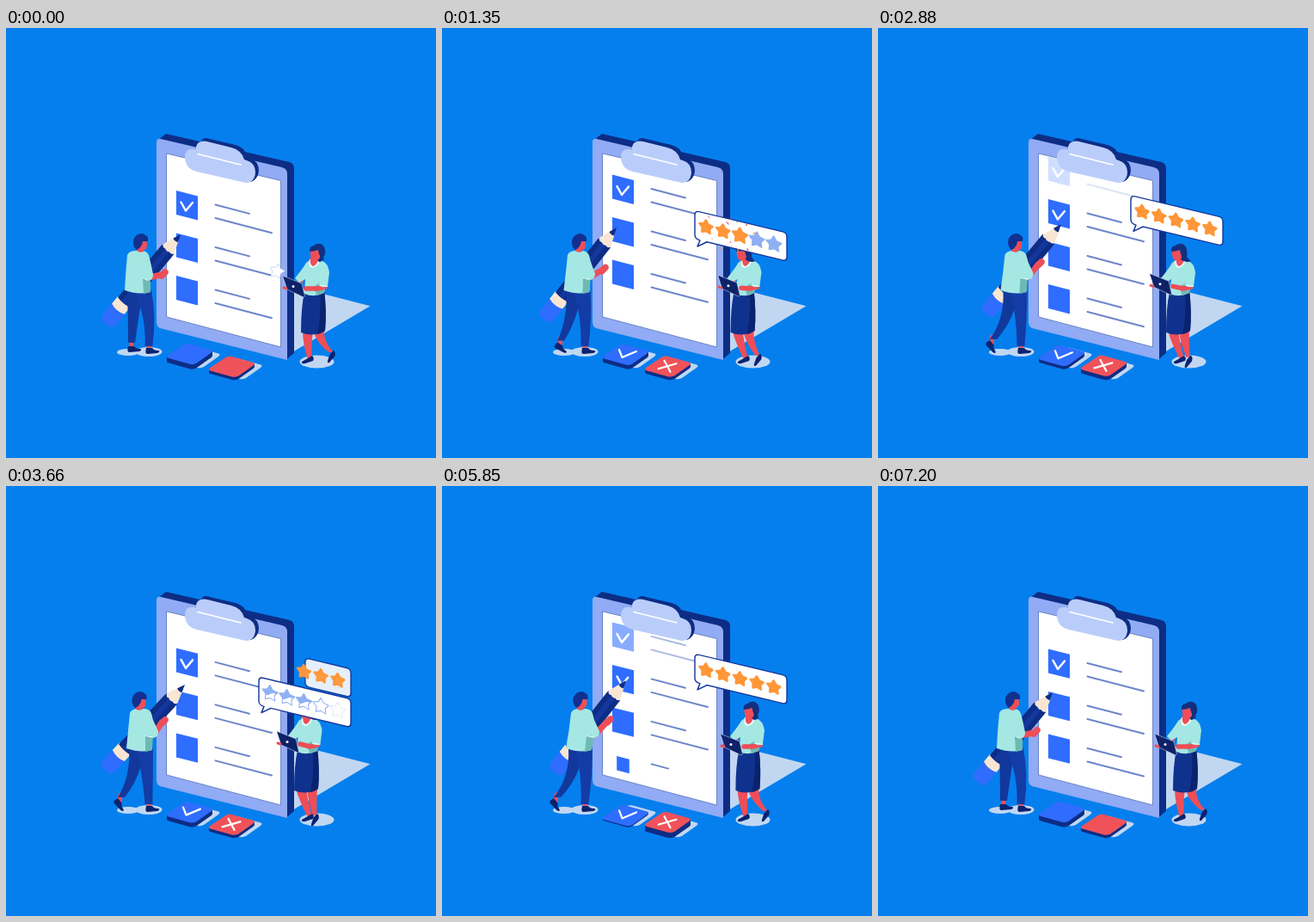
Write an HTML page with a canvas that moves like this. It is 500 px wide and 500 px high and loops after 7230 ms.

```html
<!DOCTYPE html>
<html lang="en">
<head>
<meta charset="utf-8">
<title>Checklist survey</title>
<style>
html, body { margin: 0; width: 100%; height: 100%; overflow: hidden; background: #057fee; }
canvas { display: block; width: 500px; height: 500px; }
</style>
</head>
<body>
<canvas id="stage"></canvas>
<script>
const canvas = document.getElementById('stage');
const g = canvas.getContext('2d');
const dpr = window.devicePixelRatio || 1;
canvas.width = canvas.height = 500 * dpr;

const LOOP = 7230, HALF = LOOP / 2, SLOPE = 0.26;
const BLUE = '#2f6dff', NAVY = '#0d2d85', PANTS = '#12389c', SKIN = '#ee4e57',
      MINT = '#a5e7e3', MINT2 = '#6fb9b4', SHADE = '#c1d7f1', CREAM = '#f8e6d3', ORANGE = '#ff9638';

const clamp = v => Math.max(0, Math.min(1, v));
const ramp = (t, a, b) => clamp((t - a) / (b - a));
const easeOut = v => 1 - (1 - v) ** 3;
const back = v => 1 + 2.7 * (v - 1) ** 3 + 1.7 * (v - 1) ** 2;

// Smooth curve through rows of [time, ...values]
function curve(keys, t) {
  const n = keys.length;
  if (t <= keys[0][0]) return keys[0].slice(1);
  if (t >= keys[n - 1][0]) return keys[n - 1].slice(1);
  let i = 0;
  while (keys[i + 1][0] < t) i++;
  const a = keys[i], b = keys[i + 1], d = b[0] - a[0], u = (t - a[0]) / d;
  const slope = (j, c) => {
    if (j === 0 || j === n - 1) return 0;
    const l = (keys[j][c] - keys[j - 1][c]) / (keys[j][0] - keys[j - 1][0]);
    const r = (keys[j + 1][c] - keys[j][c]) / (keys[j + 1][0] - keys[j][0]);
    return l * r <= 0 ? 0 : 2 * l * r / (l + r);
  };
  return a.slice(1).map((v, k) => {
    const c = k + 1, u2 = u * u, u3 = u2 * u;
    return (2 * u3 - 3 * u2 + 1) * v + (u3 - 2 * u2 + u) * d * slope(i, c)
      + (3 * u2 - 2 * u3) * b[c] + (u3 - u2) * d * slope(i + 1, c);
  });
}

function shape(d, fill, stroke, width = 1) {
  const p = new Path2D(d);
  if (fill) { g.fillStyle = fill; g.fill(p); }
  if (stroke) { g.strokeStyle = stroke; g.lineWidth = width; g.stroke(p); }
}

function ellipse(x, y, rx, ry, fill) {
  g.beginPath();
  g.ellipse(x, y, rx, ry, 0, 0, 7);
  g.fillStyle = fill;
  g.fill();
}

// Open line drawn up to a fraction of its length
function trace(pts, part, color, width) {
  if (part <= 0) return;
  let len = 0;
  g.beginPath();
  pts.forEach(([x, y], i) => {
    g.lineTo(x, y);
    if (i) len += Math.hypot(x - pts[i - 1][0], y - pts[i - 1][1]);
  });
  if (part < 1) g.setLineDash([len * part, len * 2]);
  g.strokeStyle = color;
  g.lineWidth = width;
  g.stroke();
  g.setLineDash([]);
}

function at(x, y, draw, angle = 0, scale = 1) {
  g.save();
  g.translate(x, y);
  g.rotate(angle);
  g.scale(scale, scale);
  draw();
  g.restore();
}

function leg([ax, ay, aw], [bx, by, bw], [cx, cy, cw], color) {
  shape(`M${ax - aw},${ay} Q${bx - bw},${by} ${cx - cw},${cy} L${cx + cw},${cy} Q${bx + bw},${by} ${ax + aw},${ay}Z`, color);
}

function board() {
  shape('M335,300.5 L423.5,323.2 L333,377Z', SHADE);
  shape('M177,130 L186,123 L330,156 Q335,158 335,163 V378 L326,385.5Z', NAVY);
  shape('M175,133 Q175,128 180,129 L321,162 Q327,164 327,169 V386 L179,349 Q175,347 175,342Z', '#91abf4');
  shape('M187,146 L319.5,177.5 V371 L187,336Z', '#fff', '#5871b8', 0.8);
}

function clip() {
  shape('M222,137 L229,129 Q232,127 237,129 L267,136 Q278,139 280,149 L284,151 Q294,155 294,166 Q293,176 285,179 L270,166Z', NAVY);
  shape('M221,142 C220,133 227,130 234,132 L262,139 Q274,142 277,153 L280,154 Q290,157 290,168 Q289,180 279,180 L222,167 Q209,164 208,151 Q208,139 219,141Z', '#bacdfa');
  trace([[223, 146.5], [273, 159]], 1, '#fff', 1.5);
}

function rows(u) {
  g.save();
  g.clip(new Path2D('M187,146 L319.5,177.5 V371 L187,336Z'));
  const shift = 49.5 * u / HALF;
  for (let i = 0; i < 4; i++) {
    const last = i === 3, y = 189 + 49.5 * i - shift;
    const size = last ? ramp(u, 2130, 2310) : 1;
    if (size === 0) continue;
    g.globalAlpha = i ? 1 : 1 - ramp(u, 1430, 3300);
    at(210.5, y + 17.2, () => shape('M-12.5,-17.2 L12.5,-10.8 V17.2 L-12.5,10.8Z', BLUE), 0, size);
    trace([[243.5, y + 16.5], [283, y + 16.5 + 40 * SLOPE]], last ? ramp(u, 2130, 2340) : 1, '#6d86ca', 2);
    trace([[243.5, y + 32], [309, y + 32 + 66 * SLOPE]], last ? ramp(u, 2300, 2600) : 1, '#6d86ca', 2);
    g.globalAlpha = 1;
    const tick = i === 0 ? 1 : i === 1 ? ramp(u, 1750, 2260) : 0;
    trace([[203.5, y + 13.5], [209, y + 23.5], [217, y + 14]], tick, '#fff', 2.4);
  }
  g.restore();
}

function diamond(x, y, color) {
  at(x, y, () => shape('M-25,4.5 Q-28,3 -25,1 L-7,-11 Q-4,-13 0,-12 L25,-5 Q28,-4 25,-1.5 L8,10.5 Q4,12.5 0,11.5Z', color));
}

function button(x, y, h, top, side) {
  for (let k = 0; k <= h; k++) diamond(x, y - k, side);
  diamond(x, y - h - 0.5, top);
}

function buttons(t) {
  const ph = t * 4 / LOOP % 1;
  const [a, b] = curve([[0, 5, 3], [.14, 1, 4.8], [.3, .8, 6], [.45, 1.5, 5.5], [.7, 4, 3.3], [1, 5, 3]], ph);
  const shown = (from, to) => ramp(t, from, to) * (1 - ramp(t, 6500, 6850));
  diamond(222, 383.5, SHADE);
  diamond(271, 396.5, SHADE);
  button(213.5, 384.8, a, BLUE, NAVY);
  button(262.5, 397.5, b, '#f0525a', NAVY);
  at(213.5, 384.3 - a, () => trace([[-7.5, -6], [-4, 3], [12.5, -4]], shown(250, 550), '#fff', 2.2));
  at(262.5, 397 - b, () => {
    trace([[-11, 2.5], [10, -3.5]], shown(300, 500), '#fff', 2.2);
    trace([[-4, -7], [3, 6]], shown(500, 700), '#fff', 2.2);
  });
}

const tipKeys = [[0, 203, 240], [600, 203, 241], [1300, 203, 233], [1750, 203, 224], [1900, 209, 231],
  [2100, 214, 225], [2300, 216, 224], [3000, 212, 229], [3660, 208, 231], [4890, 203, 231], [5400, 203, 223],
  [5550, 209, 231], [5850, 214, 226], [6000, 216, 223], [6700, 204, 238], [7200, 203, 240]];
// shoulder, waist, head, stride, hand x, hand y, pencil angle
const manKeys = [[0, 153, 155, 156, 0, 184, 285, 50.1], [600, 153, 155, 154, .15, 184, 286, 50],
  [2100, 163, 162, 164, 1, 194, 273, 53.2], [3660, 156, 157, 154.5, 1, 184, 273, 47],
  [4890, 158, 158, 158, 1, 185, 274, 53.4], [5850, 162, 161, 160.5, 1, 195, 272, 52],
  [7200, 153, 155, 156, 0, 184, 285, 50.1]];

const shoe = () => shape('M-4,-1 C-5,4 -5,6 -2,6 L9,5 C12,4 12,2 9,2 Q5,2 3,-1Z', '#0b2270');

function pencil(x, y, angle) {
  at(x, y, () => {
    shape('M112,-9.8 H129 Q136,-9 136,-3 V4 Q136,9 129,9.8 H112Z', BLUE);
    shape('M102,-9.4 H113 Q117,0 113,9.7 H102Z', CREAM);
    shape('M6,-2.5 L22,-8.5 Q28,0 22,8.5 L6,2.5Z', CREAM);
    shape('M0,0 L9,-3.6 Q11,0 9,3.6Z', NAVY);
    shape('M22,-8.7 Q24,-9 27,-9 H103 Q105,0 103,9 H27 Q24,9 22,8.7 Q26,6 24,3 Q27,0 24,-3 Q26,-6 22,-8.7Z', NAVY);
    shape('M25,-3 H103 V3 H25Z', '#14379d');
  }, Math.PI - angle * Math.PI / 180);
}

function man(t) {
  const [sx, wx, hx, s, px, py, angle] = curve(manKeys, t);
  const [tx, ty] = curve(tipKeys, t);
  ellipse(142, 377, 13, 4, SHADE);
  ellipse(166, 376.5, 15.5, 5.5, SHADE);
  pencil(tx, ty, angle);

  const fx = 146 - 14 * s, fy = 371 - 4 * s;
  trace([[fx + s, fy - 8], [fx, fy + 1]], 1, SKIN, 5);
  at(fx, fy, shoe, s * 0.9);
  trace([[166, 368], [166, 374]], 1, SKIN, 5);
  at(167, 373, shoe);
  leg([wx - 5, 305, 9], [wx - 7 + s, 338, 6], [fx + 2 * s, fy - 5, 4], PANTS);
  leg([wx + 4, 305, 10], [wx + 14 - 6 * s, 336, 6], [166, 370, 4.4], '#133ca6');

  shape(`M${sx - 12},264 Q${sx - 10},259 ${sx - 2},259 L${sx + 6},259 Q${sx + 13},260 ${sx + 14},268
    L${wx + 13},307 Q${wx},311 ${wx - 17},305 Q${sx - 14},285 ${sx - 12},264Z`, MINT);
  shape(`M${sx + 6},291 L${sx + 15},288 L${wx + 13},307 L${wx + 5},309Z`, MINT2);
  const ex = sx + 14 + 3 * s, ey = 290 - s;
  trace([[ex - 1, ey], [px - 3, py + 2]], 1, SKIN, 7);
  trace([[px - 3, py + 3], [px + 1, py - 1]], 1, SKIN, 7.5);
  shape(`M${sx + 5},262 Q${sx + 13},262 ${sx + 15},272 L${ex + 4},${ey - 4} Q${ex + 5},${ey + 3} ${ex - 3},${ey + 4}
    Q${sx + 8},${ey + 2} ${sx + 4},282Z`, MINT);
  trace([[sx + 6, 290.5], [ex - 3, ey + 3]], 1, '#e9fffb', 1);

  at(hx, 249, () => {
    shape('M-4,3 L5,4 L4,11 Q-1,13 -4,10Z', SKIN);
    shape('M-1,-3 H7 Q9,3 7,8 Q4,10 0,8Z', SKIN);
    shape('M-8,2 C-9,-6 -3,-10 2,-10 Q5,-10 6,-8 Q10,-7 9,-1 L3,-1 L2,3 Q0,7 -4,9 Q-7,7 -8,2Z', '#12308f');
  });
}

// body lean, torso shift, shoe x, shoe y, laptop x, laptop y
const womanKeys = [[0, 0, 0, 379, 381, 322, 289], [600, .75, -4, 372, 383, 323, 289],
  [2100, 1, -5, 365, 386, 318, 287], [3660, 1, -8.5, 360, 387, 315, 286],
  [4890, .88, -4.5, 367, 385, 320, 288], [5850, .2, -1, 377, 382, 324, 289], [7200, 0, 0, 379, 381, 322, 289]];

function woman(t) {
  const [b, mx, fx, fy, lx, ly] = curve(womanKeys, t);
  const dx = -8 * b;
  ellipse(361.5, 388, 20, 7.5, SHADE);
  leg([364 + dx, 352, 6], [364 + dx, 364, 5], [fx - 1, fy - 4, 2.5], SKIN);
  at(fx, fy, () => shape('M2,-6 Q5,-3 3,1 L-3,8 Q-6,9 -5,6 L-3,0 L-2,-2Z', '#0b2270'));
  leg([351 + dx, 352, 6], [350 + dx / 2, 366, 5], [353, 384, 2.6], SKIN);
  shape('M356,381 Q359,384 357,387 L348,390 Q343,391 344,388 L351,384Z', '#0b2270');

  at(dx, 0, () => {
    shape('M347,307 L370,305 Q373,330 371,352 Q357,360 343,354 Q343,325 347,307Z', '#10328f');
    shape('M365,306 L370,305 Q373,330 371,352 Q367,355 362,356 Q367,330 365,306Z', '#0a236f');
  });

  trace([[349 + mx, 284], [341 + mx, 297], [lx + 20, ly + 12]], 1, SKIN, 5);
  at(mx, 0, () => {
    shape(`M353,270 Q360,267 368,271 Q375,274 375,283 L372,296 L${370 + dx - mx},308 Q358,314 ${347 + dx - mx},309
      L348,292 L341,296 L336,291 Q345,280 349,273Z`, MINT);
    shape(`M367,287 L364,297 L357,301 L${362 + dx - mx},311 L${370 + dx - mx},308 L371,298Z`, MINT2);
    shape('M353,269 Q351,278 356,279 Q363,278 365,270 L360,266Z', '#e9fffb');
    shape('M354,268 Q353,276 357,277 Q361,276 363,270 L362,262 H355Z', SKIN);
  });

  at(lx, ly, () => {
    shape('M0,0 Q0,-1 2,0 L22,8 L25.5,23 L24,24 L5,15Z', '#0d2268', '#dfe9fb', 0.5);
    ellipse(12, 11.5, 1.5, 1.5, '#fff');
  });
  trace([[371 + mx, 301], [362 + mx, 303], [lx + 27, ly + 14]], 1, SKIN, 5.5);
  trace([[lx + 4, ly + 14], [lx + 1, ly + 13]], 1, SKIN, 3);
  shape(`M${366 + mx},276 Q${375 + mx},274 ${376 + mx},284 L${374 + mx},300 Q${368 + mx},303 ${364 + mx},299Z`, MINT);
  trace([[365 + mx, 299], [373.5 + mx, 300.5]], 1, '#e9fffb', 1.2);

  at(362 - 12 * b, 261, () => {
    shape(`M-4,-6 C-1,-12 8,-11 9,-3 Q10,2 ${7 + 2 * b},5 Q${9 + 3 * b},9 ${5 + 9 * b},10 Q${b * 6},13 0,6Z`, '#12307f');
    shape('M-8,-3 Q-9,5 -5,9 Q0,11 3,6 V-5 Q-3,-8 -8,-3Z', SKIN);
    shape('M-9,-1 Q-10,-7 -4,-8 Q-1,-11 4,-10 Q9,-8 8,0 L3,4 Q1,0 1,-3 Q-5,-1 -9,-1Z', '#12307f');
  });
}

function starPath(r) {
  let d = '';
  for (let k = 0; k < 10; k++) {
    const a = -Math.PI / 2 + k * Math.PI / 5, q = k % 2 ? r * 0.56 : r;
    d += `${k ? 'L' : 'M'}${q * Math.cos(a)},${q * Math.sin(a)}`;
  }
  return d + 'Z';
}

function burst(age) {
  if (age <= 0 || age >= 1) return;
  g.globalAlpha *= 1 - age * age;
  for (let k = 0; k < 9; k++) {
    const a = k * 0.7 + 0.3, r = 7 + 10 * easeOut(age) * (1 + k % 3 * 0.15);
    const c = Math.cos(a), s = Math.sin(a), l = k % 3 + 0.5;
    trace([[r * c, r * s], [(r + l) * c, (r + l) * s]], 1, k % 2 ? '#ef4f57' : ORANGE, 1.3);
  }
}

function star(ph, i, x, gone) {
  const start = 250 + 90 * i, pop = 800 + 200 * i;
  if (ph < start || gone) return;
  g.save();
  g.translate(x, 15.8 + x * 0.012);
  const v = ramp(ph, pop, pop + 220);
  if (v < 1) {
    const p = starPath(9.6);
    g.save();
    g.globalAlpha *= ramp(ph, start, start + 120);
    shape(p, '#fff', '#8aa9ee', 1);
    g.clip(new Path2D(p));
    const h = 10 * ramp(ph, start + 120, start + 170) + 9 * ramp(ph, 700, 900);
    if (h) shape(`M-11,-11 H11 V${h - 9} Q5,${h - 13} 0,${h - 9} T-11,${h - 9}Z`, '#8fb0f4');
    g.restore();
  }
  if (v > 0) {
    const k = Math.max(0, back(v));
    g.scale(k, k);
    shape(starPath(7.8), ORANGE, ORANGE, 2.6);
    burst((ph - pop) / 500);
  }
  g.restore();
}

function bubble(ph) {
  if (ph < 0 || ph > 4020) return;
  if (ph < 260) {
    const u = ph / 260;
    at(315 - 9 * u, 283 - 25 * u, () => shape(starPath(9), '#fff', '#cfdcf6', 1), 0.25);
  }
  const grow = easeOut(ramp(ph, 130, 640));
  if (grow <= 0) return;
  const [y] = curve([[0, 230], [600, 222.5], [1840, 206], [2100, 203], [2800, 195.5], [3660, 187], [4020, 183.5]], ph);
  const left = 107 * ramp(ph, 3295, 4020), exit = left > 0;
  g.save();
  g.transform(1, 0.24, 0, 1, 294, y);
  g.translate(3, 41);
  g.scale(grow, grow);
  g.translate(-3, -41);
  g.globalAlpha = 1 - 0.08 * ramp(ph, 3295, 4020);
  if (left < 100) {
    const foot = exit ? `H${left + 5}` : 'H14 L3,41 L6,33';
    const tint = exit ? '#f0f5fd' : '#fff';
    shape(`M${left + 5},0 H102 Q107,0 107,5 V28 Q107,33 102,33 ${foot} Q${left},33 ${left},28 V5 Q${left},0 ${left + 5},0Z`,
      tint, '#12359a', 1.4);
  }
  for (let i = 0; i < 5; i++) {
    const x = 13 + 19.7 * i;
    star(ph, i, x, left > x + 4);
  }
  g.restore();
}

function draw(now) {
  const t = now % LOOP;
  g.setTransform(dpr, 0, 0, dpr, 0, 0);
  g.globalAlpha = 1;
  g.lineCap = g.lineJoin = 'round';
  g.fillStyle = '#057fee';
  g.fillRect(0, 0, 500, 500);
  board();
  rows(t % HALF);
  clip();
  buttons(t);
  man(t);
  woman(t);
  bubble(t);
  bubble(t - 3020);
}

let origin = null;
function tick(now) {
  if (origin === null) origin = now;
  draw(now - origin);
  requestAnimationFrame(tick);
}
draw(0);
requestAnimationFrame(tick);
</script>
</body>
</html>
```
